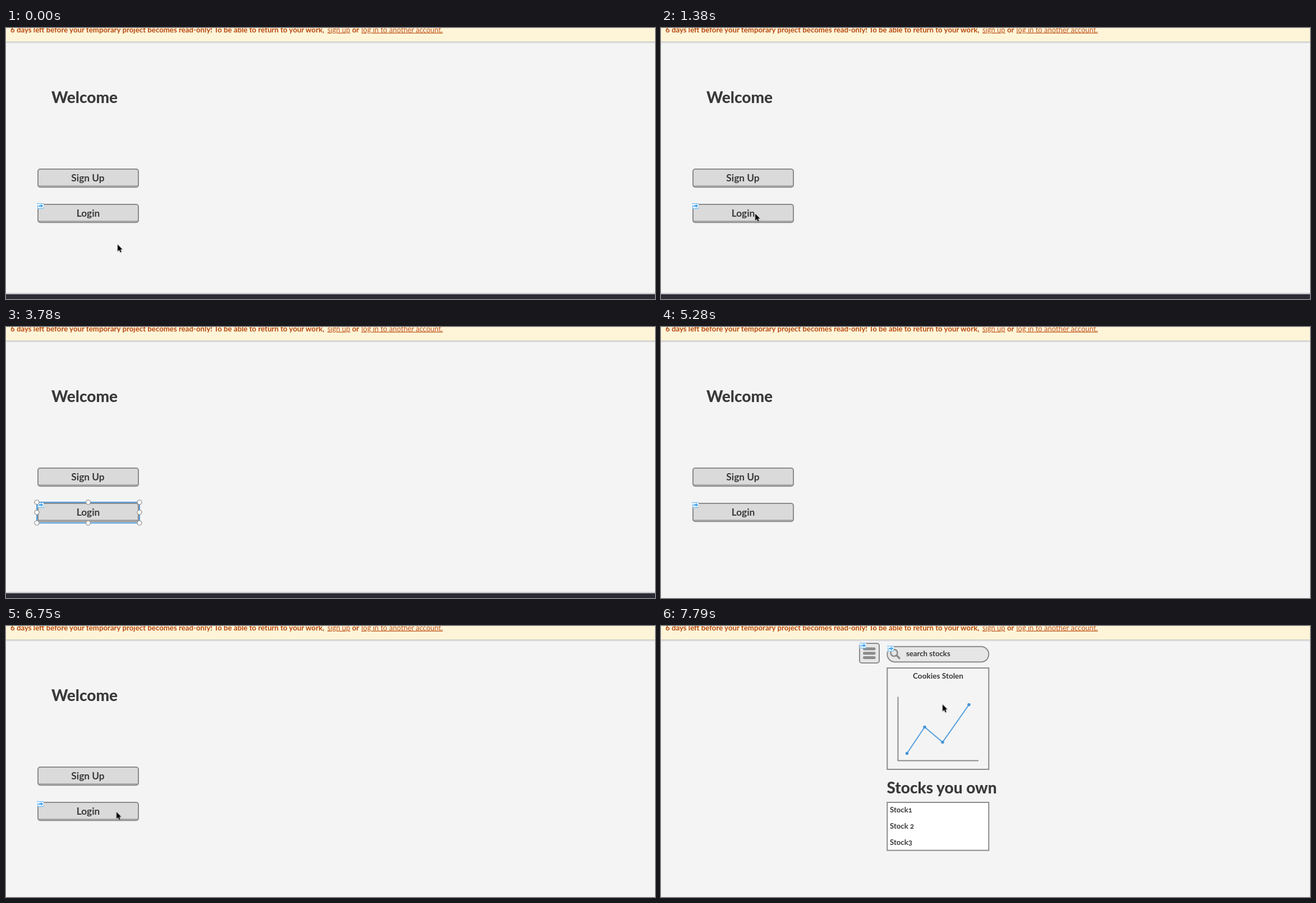
Recreate the animation shown at these times as an HTML page. Size 1157 by 484 pixels, loop 8000 ms.

```html
<!DOCTYPE html>
<html lang="en">
<head>
<meta charset="utf-8">
<title>Mockup walkthrough</title>
<style>
  html, body { margin: 0; width: 100%; height: 100%; overflow: hidden; background: #f4f4f4; }
  svg { display: block; width: 1157px; height: 484px; font-family: Lato, sans-serif; }
  text { fill: #393939; font-weight: 700; white-space: pre; }
  .notice text { fill: #b8480e; font-size: 13.25px; }
  .notice .link { fill: #c25a22; font-size: 13px; font-weight: 400; text-decoration: underline; }
  .title { font-size: 28px; font-weight: 800; }
  .label { font-size: 17.3px; text-anchor: middle; }
  .small { font-size: 13.2px; font-variant-numeric: oldstyle-nums; }
  .caption { font-size: 13.6px; text-anchor: middle; }
  .box { fill: none; stroke: #8b8b8b; stroke-width: 2; }
  .field { fill: #e6e6e6; }
  .blue { fill: none; stroke: #55a0de; stroke-width: 2; }
  .handle { fill: #fff; stroke: #8f8f8f; stroke-width: 1.2; }

  .timed { animation: 8s step-end infinite; }
  #welcome { animation-name: welcome; }
  #stocks { animation-name: stocks; }
  #selection { animation-name: selection; }
  #footer { animation-name: footer; }
  #cursor { animation-name: cursor; }

  @keyframes welcome { 0% { visibility: visible } 88.125%, 100% { visibility: hidden } }
  @keyframes stocks { 0% { visibility: hidden } 88.125%, 100% { visibility: visible } }
  @keyframes selection { 0% { visibility: hidden } 28.5% { visibility: visible } 66%, 100% { visibility: hidden } }
  @keyframes footer { 0% { visibility: visible } 66%, 100% { visibility: hidden } }
  @keyframes cursor {
    0%      { transform: translate(197.5px, 386px); visibility: visible }
    6.25%   { transform: translate(196px, 384px) }
    8.125%  { transform: translate(196px, 361px) }
    9.875%  { transform: translate(202px, 303px) }
    11.75%  { transform: translate(205px, 288px) }
    13.625% { transform: translate(202.5px, 292.5px) }
    15.375% { transform: translate(168px, 328.5px) }
    17.25%  { transform: translate(166.5px, 331px) }
    45.375% { transform: translate(449px, 450px); visibility: visible }
    47.25%  { transform: translate(449px, 450px); visibility: hidden }
    73.375% { transform: translate(337.5px, 410px); visibility: visible }
    75.25%  { transform: translate(304px, 405px) }
    77.125% { transform: translate(269px, 381px) }
    78.875% { transform: translate(196px, 353px) }
    80.75%  { transform: translate(196px, 351.5px) }
    82.625% { transform: translate(195.5px, 340.5px) }
    84.375% { transform: translate(195.5px, 331.5px) }
    93.75%  { transform: translate(208.5px, 326px) }
    95.5%   { transform: translate(462px, 188px) }
    97.375%, 100% { transform: translate(500.5px, 139.5px); visibility: visible }
  }
</style>
</head>
<body>
<svg viewBox="0 0 1157 484">
  <defs>
    <linearGradient id="shade" x2="0" y2="1">
      <stop stop-color="#c6c6c6"/><stop offset="1" stop-color="#f4f4f4"/>
    </linearGradient>
    <g id="button">
      <rect x="1" y="1" width="179" height="32.3" rx="4" fill="#dadada"/>
      <path d="M2 30H179V32.3H2Z" fill="#a9a9a9"/>
      <rect class="box" x="1" y="1" width="179" height="32.3" rx="4"/>
    </g>
    <g id="linkIcon">
      <path d="M0 0H12V10H0Z" fill="#eef7fe"/>
      <path d="M0 .5H12M1.5 3V9.5H11.5V7" fill="none" stroke="#5fb2f0"/>
      <path d="M3 7V5.5Q3 3.5 5 3.5H7V1.5L11.5 4.7 7 8V6H5Q4 6 3 7Z" fill="#4ba7ee"/>
    </g>
    <circle id="handle" class="handle" r="4"/>
    <path id="arrow" d="M0 0V12.4L2.9 9.8 4.8 14.3 6.8 13.4 5 9.1H8.6Z"/>
  </defs>

  <rect width="1157" height="484" fill="#f4f4f4"/>

  <g class="notice">
    <rect y="24" width="1157" height="4" fill="url(#shade)"/>
    <rect width="1157" height="24" fill="#fef5d8"/>
    <text x="8" y="8">6 days left before your temporary project becomes read-only! To be able to return to your work,</text>
    <text class="link" x="573" y="7.5">sign up</text>
    <text x="617" y="8">or</text>
    <text class="link" x="633.5" y="7.5">log in to another account.</text>
  </g>

  <g id="welcome" class="timed">
    <text class="title" x="81" y="134">Welcome</text>
    <use href="#button" x="56" y="251"/>
    <text class="label" x="146" y="274">Sign Up</text>
    <use href="#button" x="56" y="314"/>
    <text class="label" x="146.5" y="337">Login</text>
    <use href="#linkIcon" x="55" y="313"/>
  </g>

  <g id="selection" class="timed">
    <rect class="blue" x="55" y="313" width="183" height="37"/>
    <use href="#handle" x="55" y="313"/>
    <use href="#handle" x="146.5" y="313"/>
    <use href="#handle" x="238" y="313"/>
    <use href="#handle" x="55" y="331"/>
    <use href="#handle" x="238" y="331"/>
    <use href="#handle" x="55" y="350"/>
    <use href="#handle" x="146.5" y="350"/>
    <use href="#handle" x="238" y="350"/>
  </g>

  <g id="stocks" class="timed">
    <rect class="box field" x="354" y="31" width="35" height="35" rx="4"/>
    <path d="M362.5 40.8H380M362.5 48.7H380M362.5 56.6H380" stroke="#8b8b8b" stroke-width="5" stroke-linecap="round"/>
    <use href="#linkIcon" x="354" y="30"/>

    <rect class="box field" x="403.3" y="36.8" width="181" height="27.5" rx="13.7"/>
    <g fill="none" stroke="#8b8b8b" stroke-linecap="round">
      <circle cx="415.5" cy="48" r="6" stroke-width="2.5"/>
      <path d="M420.5 53L425 57.5" stroke-width="3.5"/>
    </g>
    <use href="#linkIcon" x="403" y="35.5"/>
    <text class="small" x="437" y="54">search stocks</text>

    <rect class="box" x="403.3" y="75" width="181" height="181"/>
    <text class="small caption" x="494" y="93.5">Cookies Stolen</text>
    <path class="box" d="M422.5 126.5V240.5H566"/>
    <path class="blue" d="M438.5 227.5L470 180.5 502 207.5 549 140.5"/>
    <path d="M438.5 227.5h0M470 180.5h0M502 207.5h0M549 140.5h0" stroke="#4794d8" stroke-width="5.6" stroke-linecap="round"/>

    <text class="title" x="402.5" y="298.5">Stocks you own</text>
    <rect class="box" x="403.3" y="315" width="181" height="85.7" style="fill:#fff"/>
    <text class="small" x="408" y="332.5">Stock1</text>
    <text class="small" x="408" y="361.5">Stock 2</text>
    <text class="small" x="408" y="391">Stock3</text>
  </g>

  <g id="footer" class="timed">
    <rect y="473" width="1157" height="3" fill="#d0d0d0"/>
    <rect y="475.5" width="1157" height="9" fill="#2b2b36"/>
  </g>

  <g id="cursor" class="timed">
    <use href="#arrow" x="1.7" y="1.2" fill="none" stroke="#000" stroke-opacity=".12" stroke-width="2"/>
    <use href="#arrow" x="1.5" y=".5" stroke="#fff" stroke-width="1.2" paint-order="stroke"/>
  </g>
</svg>
</body>
</html>
```
